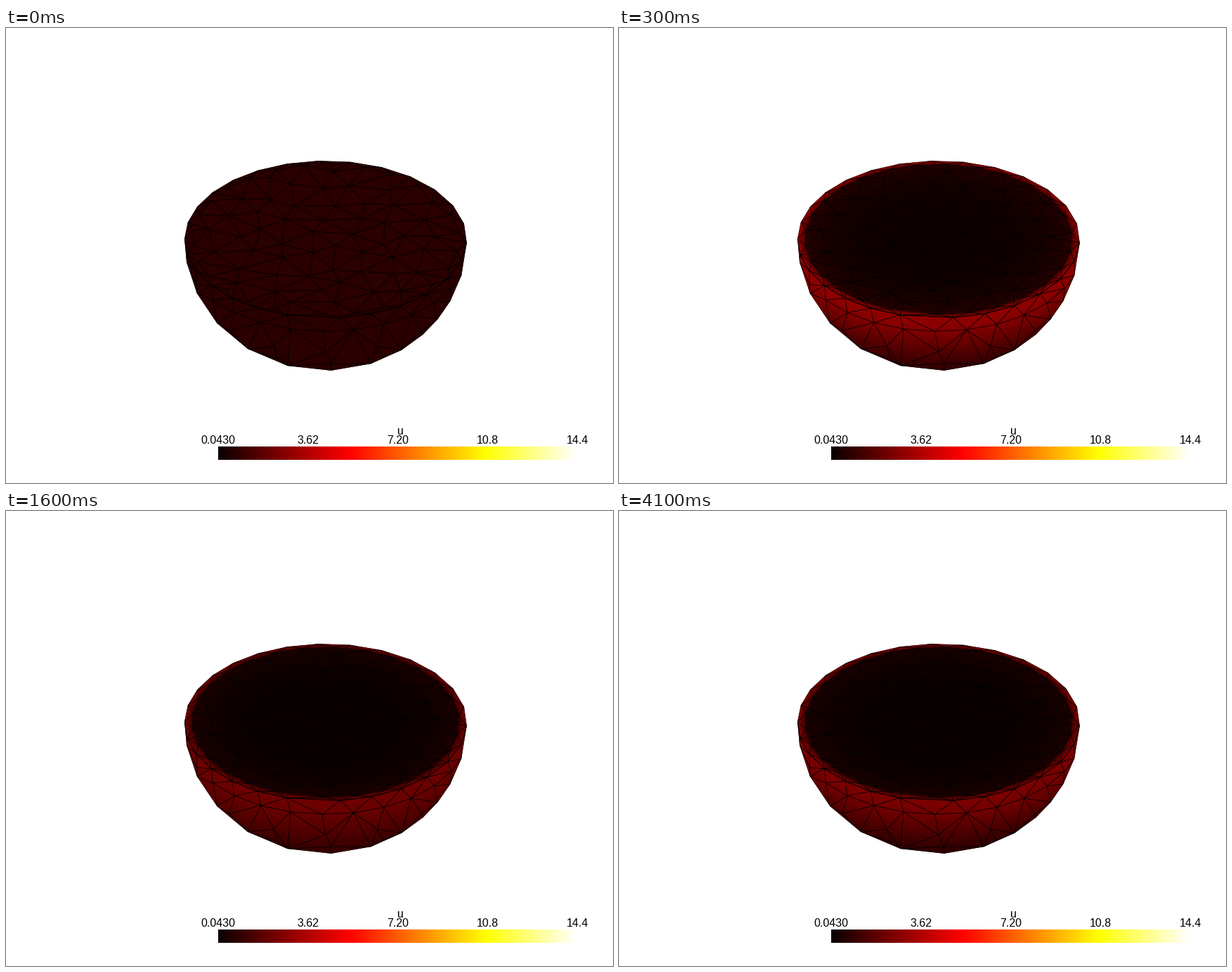
Write a matplotlib script that moves like this. It is 864 by 648 pixels and loops after 8 s.

```python
import numpy as np
import matplotlib.pyplot as plt
from matplotlib.animation import FuncAnimation
from matplotlib.collections import LineCollection
from matplotlib.patches import Polygon
from matplotlib.tri import Triangulation

W, H, DPI = 864, 648, 72
CX, CY = 455, 301
RX, RIM_RY, HULL_RY = 201, 112, 187
rng = np.random.default_rng(4)


def oval(degrees, rx, ry, drop=0):
    """Points on an ellipse around the bowl's centre, moved down by drop."""
    a = np.radians(degrees)
    return np.column_stack([CX + rx * np.cos(a), CY + ry * np.sin(a) + drop])


def polar(x, y):
    """Angle and radius with the rim ellipse scaled to a unit circle."""
    dx, dy = (x - CX) / RX, (y - CY) / RIM_RY
    return np.arctan2(dy, dx), np.hypot(dx, dy)


def loop_radius(loop, angle):
    """Radius of a closed polygon at the given angles."""
    nxt = np.roll(loop, -1, axis=0)
    dense = np.vstack([loop + (nxt - loop) * k / 8 for k in range(8)])
    a, r = polar(*dense.T)
    return np.interp(angle, a, r, period=2 * np.pi)


def spiral(n, reach):
    """Evenly spread, slightly jittered points inside the bowl."""
    k = np.arange(n) + 0.5
    r = reach * np.sqrt(k / n)
    spot = oval(np.degrees(k * np.pi * (3 - np.sqrt(5))), r * RX, r * RIM_RY)
    return spot + rng.uniform(-1, 1, (n, 2)) * (9, 5)


# Mesh vertices: rim, inner lip, lower silhouette, inside and outer skin
k = np.arange(27)
rim_deg = 106 + 13 * k - 8 * np.sin(np.pi * k / 26) ** 2
rim = oval(rim_deg, RX, RIM_RY)
lip = oval(rim_deg + 6.5, 190, 107)
s = np.linspace(0, 1, 12)
hull = oval(170 - 154 * s - 15 * np.sin(np.pi * s ** 1.3) ** 2, RX, HULL_RY)
rows = [oval(np.linspace(start, stop, n), RX, RIM_RY, drop)
        for start, stop, n, drop in ((156, 27, 11, 19), (133, 47, 5, 48), (110, 66, 3, 65))]
silhouette = np.vstack([rim[6:21], hull[::-1]])


def bowl_edges():
    disc = np.vstack([rim, lip, spiral(52, 0.87)])
    disc_mesh = Triangulation(*((disc - (CX, CY)) / (RX, RIM_RY)).T)

    skin = np.vstack([rim[:7], rim[20:], hull, *rows])
    skin_mesh = Triangulation(*skin.T)
    a, r = polar(*skin[skin_mesh.triangles].mean(axis=1).T)
    skin_mesh.set_mask(r < loop_radius(rim, a))
    return np.vstack([disc[disc_mesh.edges], skin[skin_mesh.edges]])


# Pixel grid covering the bowl
X0, X1, Y0, Y1 = 250, 660, 185, 493
gx, gy = np.meshgrid(np.arange(X0, X1) + 0.5, np.arange(Y0, Y1) + 0.5)
angle, radius = polar(gx, gy)
r_rim, r_lip = loop_radius(rim, angle), loop_radius(lip, angle)
lip_part = np.sqrt(np.clip((radius - r_lip) / (r_rim - r_lip), 0, 1))
core_part = np.clip(radius / r_lip, 0, 1) ** 4
front = CY + RIM_RY * np.sqrt(np.clip(1 - ((gx - CX) / RX) ** 2, 0, 1))
depth = np.clip(gy - front, 0, None)


def heat(t):
    """Uniform at first, then a hot rim that cools with a slow dip."""
    if t == 0:
        return np.full_like(gx, 0.047)
    burst = np.exp(-(t - 0.1) / 0.07)
    dip = np.exp(-((t - 1.6) / 0.8) ** 2)
    edge = 0.17 - 0.02 * dip + 0.55 * burst
    reach = 66 + 14 * dip - 37 * burst
    core = 0.03 * np.sqrt(burst)
    inner = core + (0.026 + core) * core_part
    inner += (edge - inner) * lip_part
    outer = edge * np.exp(-(depth / reach) ** (1.8 - 0.7 * burst))
    return np.where(radius < r_rim, inner, outer)


fig = plt.figure(figsize=(W / DPI, H / DPI), dpi=DPI, facecolor="white")
ax = fig.add_axes([0, 0, 1, 1])

bowl = ax.imshow(heat(0), cmap="hot", vmin=0, vmax=1, interpolation="nearest",
                 extent=(X0, X1, Y1, Y0), aspect="auto")
mesh = ax.add_collection(LineCollection(bowl_edges(), colors="black", linewidths=0.85))
outline = ax.add_patch(Polygon(silhouette, fc="none", ec="none"))
for part in (bowl, mesh):
    part.set_clip_path(outline)

# Colour bar
ax.imshow(np.linspace(0, 1, 256)[None], cmap="hot", interpolation="nearest",
          extent=(302, 813, 615, 596), aspect="auto")
font = dict(family="Liberation Sans", size=16, color="black", ha="center", va="baseline")
for i, label in enumerate(("0.0430", "3.62", "7.20", "10.8", "14.4")):
    ax.text(302 + 127.8 * i, 592, label, **font)
ax.text(561.5, 579, "u", **font)

ax.set_xlim(0, W)
ax.set_ylim(H, 0)
ax.axis("off")

# Frames at which the solution advances; it holds in between
STEPS = np.array([0, 1, 2, 3, 4, 6, 8, 10, 13, 16, 21, 33, 37, 41])


def draw(i):
    bowl.set_data(heat(STEPS[STEPS <= i].max() / 10))
    return (bowl,)


anim = FuncAnimation(fig, draw, frames=80, interval=100, repeat=True, repeat_delay=0)
plt.show()
```
